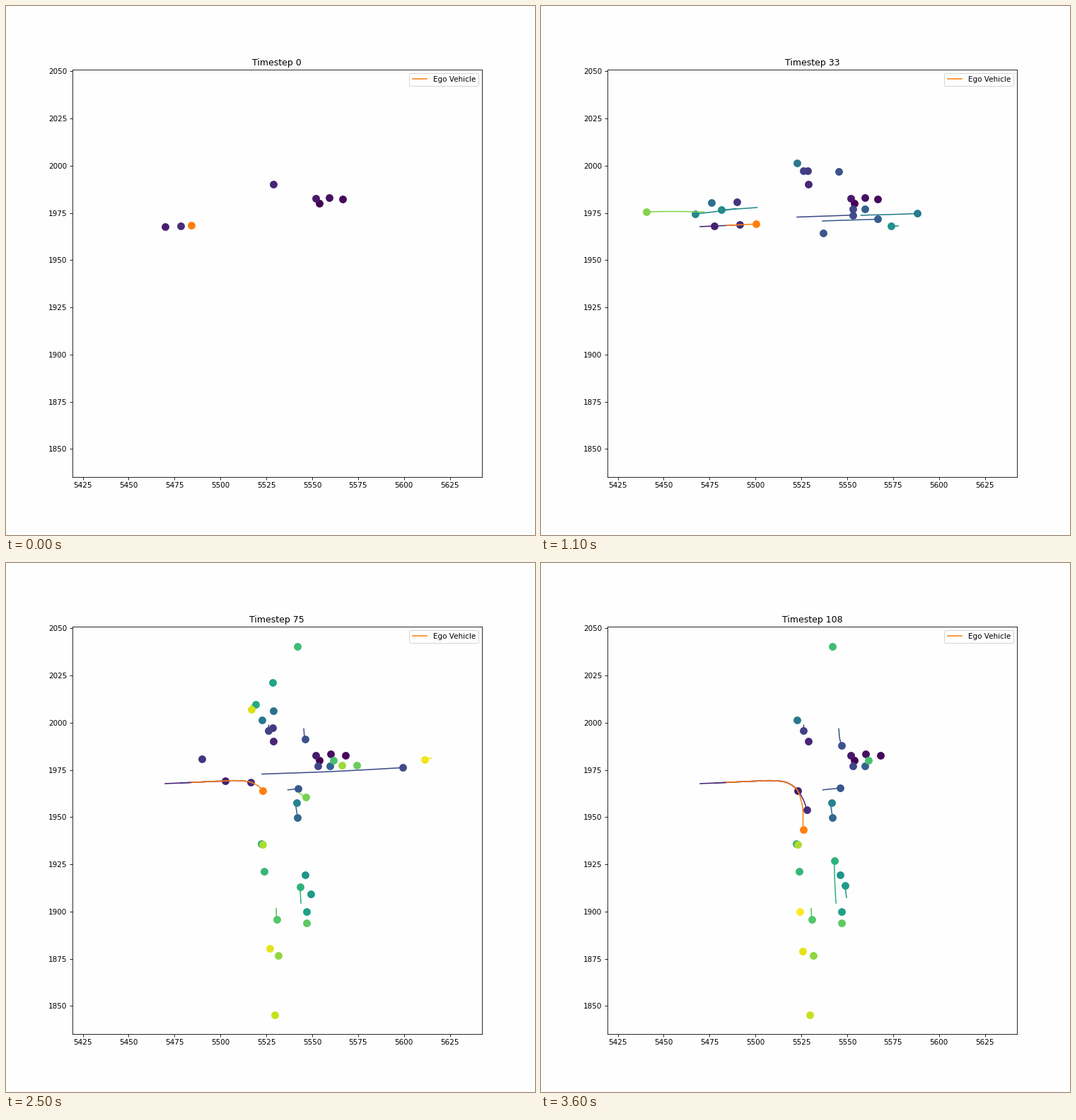
Recreate the animation shown at these times as a matplotlib script. Size 748 by 748 pixels, loop 3700 ms.

```python
import numpy as np
import matplotlib.pyplot as plt
from matplotlib.animation import FuncAnimation

FRAMES, INTERVAL, STRIDE = 37, 100, 3
END = (FRAMES - 1) * STRIDE
EGO = "#ff7f0e"

fig, ax = plt.subplots(figsize=(10, 10), dpi=74.8, facecolor="#fefefe")
ax.set_facecolor("#fefefe")
ax.set_xlim(5419.2, 5642.6)
ax.set_ylim(1835.3, 2051.0)
ax.set_xticks(range(5425, 5626, 25))
ax.set_yticks(range(1850, 2051, 25))
title = ax.set_title("Timestep 0")


def to_world(px, py):
    """Stage pixels (y down) to map coordinates."""
    return 5425 + (px - 108.5) / 2.595, 2050 - (py - 92.5) / 2.67


def smooth(t, keys, vals):
    """Cubic Hermite curve through the values, held at both ends."""
    slope = np.gradient(vals, keys)
    t = np.clip(t, keys[0], keys[-1])
    i = np.clip(np.searchsorted(keys, t, side="right") - 1, 0, len(keys) - 2)
    h = keys[i + 1] - keys[i]
    u = (t - keys[i]) / h
    return (vals[i] * (1 + 2 * u) * (1 - u) ** 2
            + slope[i] * h * u * (1 - u) ** 2
            + vals[i + 1] * u * u * (3 - 2 * u)
            + slope[i + 1] * h * u * u * (u - 1))


class Agent:
    def __init__(self, start, x, y):
        self.start, self.count = start, len(x)
        self.x, self.y = to_world(x, y)

    def draw(self, color):
        self.dot, = ax.plot([], [], "o", color=color, ms=80 ** 0.5, mew=1.5, zorder=1)
        self.line, = ax.plot([], [], color=color, zorder=2)

    def show(self, t):
        n = t - self.start + 1
        if not 0 < n <= self.count:
            n = 0
        self.line.set_data(self.x[:n], self.y[:n])
        self.dot.set_data(self.x[:n][-1:], self.y[:n][-1:])


agents = []


def add(start, *points, end=END, when=None):
    """Stand still, or pass the points at an even pace during `when`."""
    steps = np.arange(start, end + 1)
    x, y = np.array(points, float).T
    if len(points) == 1:
        x, y = np.full(len(steps), x), np.full(len(steps), y)
    else:
        keys = np.linspace(*(when or (start, end)), len(points))
        x, y = smooth(steps, keys, x), smooth(steps, keys, y)
    agents.append(Agent(start, x, y))


def follow(route, offset, *pace):
    """Drive along a route; pace holds (step, distance) pairs."""
    x, y = np.array(route, float).T
    along = np.append(0, np.cumsum(np.hypot(np.diff(x), np.diff(y))))
    dist = offset + np.interp(np.arange(END + 1), *zip(*pace))
    agents.append(Agent(0, smooth(dist, along, x), smooth(dist, along, y)))


approach = [(225, 312), (262, 310.4), (300, 308.6), (330, 308), (346, 310), (361.5, 320)]
wide_turn = approach + [(370, 333), (378, 355)]
right_turn = approach + [(368.4, 338), (370.5, 378)]

# Colours run through viridis in the order of this list
add(0, (443, 279.5))
add(0, (476, 273), (480, 272.3), when=(66, 75))
add(0, (456.5, 271), (459, 270.5), when=(0, 45))
add(0, (438, 272))
follow(right_turn, 0, (0, 0), (21, 6.5), (45, 33.5), (END, 142))
add(0, (378.3, 251.7))
follow(wide_turn, 21.5, (0, 0), (21, 15.5), (END, 151))

add(3, (277, 277), (271, 276.5), end=87, when=(81, 87))
add(3, (377.3, 233), end=96)
add(3, (371.5, 229.5), (370.5, 236.7), when=(3, 60))
add(33, (440.5, 287))
add(3, (362, 298.5), (465, 294.7), (578, 288.5), end=81)
add(33, (421, 234.5), (422.3, 248), (425, 258.2))
add(30, (398.5, 320.8), (423, 318.3))
add(3, (398, 304), (480, 301.4), (560, 298.8), end=66)
add(33, (458.3, 287.5))
add(36, (410, 345), (412.3, 360.3), when=(36, 45))
add(3, (240.5, 278.5), end=72)
add(36, (377.5, 209.5), end=99)
add(33, (361.5, 221.8))
add(3, (452.5, 296), (541, 293), (646.7, 285.5), end=69)
add(39, (410.8, 339.5))
add(3, (276, 286.5), (237, 292), (200, 295.5), (171.5, 297.3), end=63)
add(3, (305.5, 285), (271, 287.4), (232, 289.2), (184, 289), end=66)
add(3, (505, 311), (494, 311.5), (485, 311.5), end=66)

add(54, (422.5, 441))
add(54, (432, 473), (429.7, 456), when=(60, END))
add(54, (424.5, 493.5))
add(39, (376.5, 169.5), end=102)
add(54, (353, 200.3), end=99)
add(54, (361, 397.5))
add(57, (417, 481), (415.3, 448.5), (414.6, 421))
add(54, (364.7, 435.7))
add(54, (412, 118.3))
add(54, (462.5, 279.3))
add(57, (382, 488.5), (382.5, 504.5), when=(57, 72))
add(57, (424.7, 509))
add(54, (495.5, 285.7), end=93)
add(36, (413, 324.5), (424.5, 331.5), end=78)

add(3, (231, 291.2), (179.5, 290.6), (121.5, 292), end=42)
add(69, (384.5, 555.3))
add(69, (475, 285.8), end=93)
add(69, (363, 398.3))
add(39, (240.5, 270.5), (236, 271), end=72)
add(69, (380, 638.8))
add(57, (347, 201), (347, 214), end=96)
add(69, (373, 545), (370, 549), when=(72, 96))
add(54, (601.5, 276), (587, 278.5), end=87)
add(81, (365.6, 493.5))

follow(right_turn, 37, (0, 0), (21, 23), (60, 84), (87, 122), (END, 161.5))

others = len(agents) - 1
for agent, color in zip(agents, [*plt.cm.viridis(np.linspace(0, 1, others)), EGO]):
    agent.draw(color)
agents[-1].line.set_label("Ego Vehicle")
ax.legend(loc="upper right")


def update(i):
    t = i * STRIDE
    title.set_text(f"Timestep {t}")
    for agent in agents:
        agent.show(t)


anim = FuncAnimation(fig, update, frames=FRAMES, interval=INTERVAL,
                     repeat=True, repeat_delay=0, blit=False)
plt.show()
```
